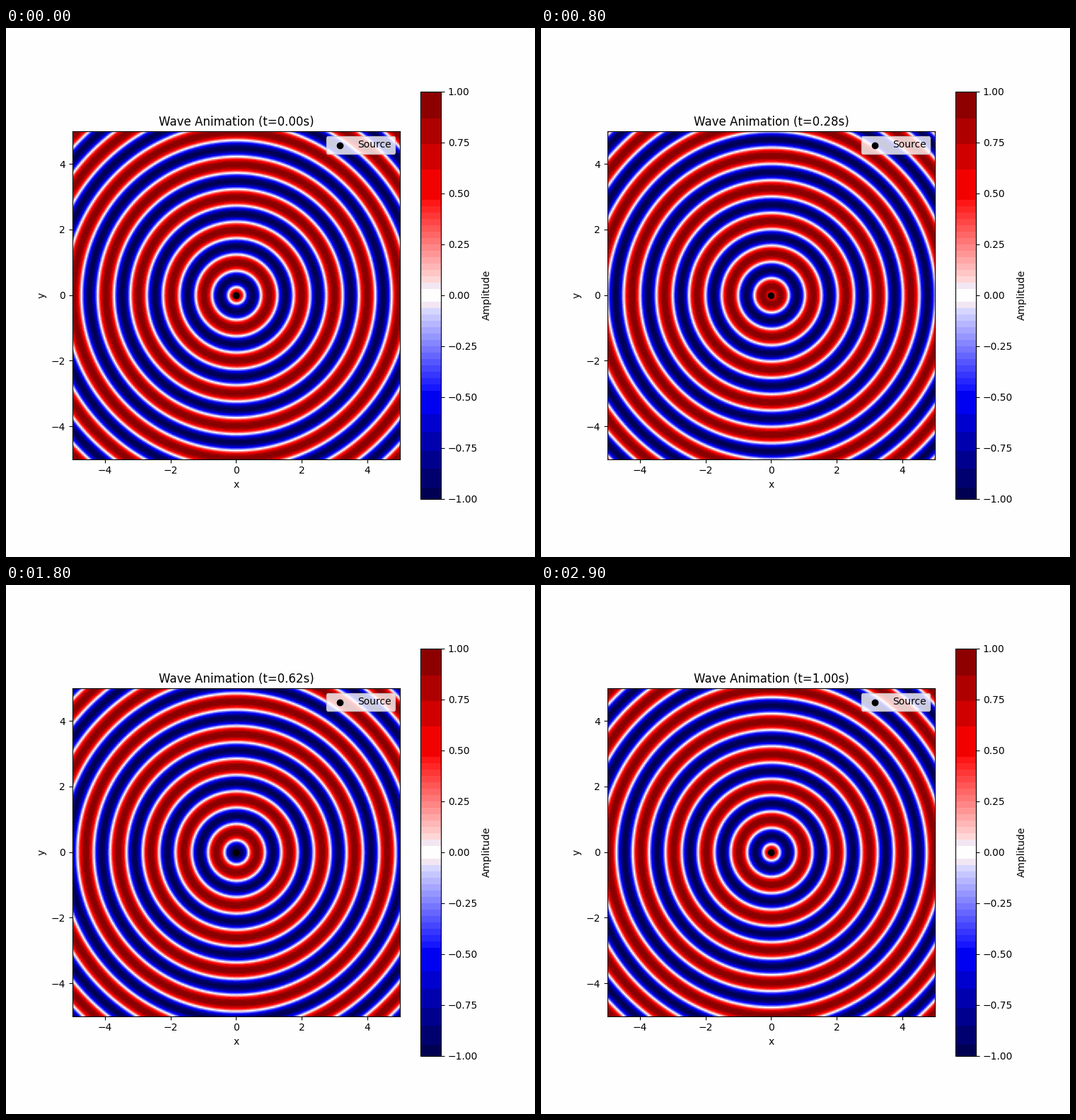
A matplotlib script that plays this animation: 748 by 748 pixels, repeating every 3000 ms.

```python
import numpy as np
import matplotlib.pyplot as plt
from matplotlib.animation import FuncAnimation
from matplotlib.colors import ListedColormap

FRAMES = 30
INTERVAL = 100
HALF = 5
OFF_WHITE = 254 / 255


def banded_seismic():
    """Seismic colours merged into coarse RGB bins (3, 4 and 3 bits)."""
    rgb = plt.get_cmap("seismic")(np.arange(256))[:, :3] * 255
    bins = rgb.astype(int) // [32, 16, 32]
    keys = bins @ [256, 16, 1]
    # A sine wave spends most of its time near its extremes.
    level = np.linspace(-1, 1, 258)[1:-1]
    weight = 1 / np.sqrt(1 - level ** 2)
    out = np.empty_like(rgb)
    for key in np.unique(keys):
        same = keys == key
        out[same] = np.average(rgb[same], axis=0, weights=weight[same])
    out[keys == keys[128]] = 255 * OFF_WHITE
    return ListedColormap(np.floor(out) / 255)


axis = np.linspace(-HALF, HALF, 200)
radius = np.hypot(*np.meshgrid(axis, axis))


def wave(t):
    return np.cos(2 * np.pi * (radius - t))


fig, ax = plt.subplots(figsize=(7.48, 7.48), dpi=100,
                       facecolor=(OFF_WHITE,) * 3)
image = ax.imshow(wave(0), extent=(-HALF, HALF, -HALF, HALF), origin="lower",
                  cmap=banded_seismic(), vmin=-1, vmax=1)
fig.colorbar(image, ax=ax, label="Amplitude")
ax.scatter(0, 0, color="black", label="Source")
ax.set_xlabel("x")
ax.set_ylabel("y")
ax.legend(loc="upper right")
title = ax.set_title("")


def update(i):
    t = i / (FRAMES - 1)
    image.set_data(wave(t))
    title.set_text(f"Wave Animation (t={t:.2f}s)")
    return image, title


anim = FuncAnimation(fig, update, frames=FRAMES, interval=INTERVAL,
                     repeat=True, repeat_delay=0)
plt.show()
```
